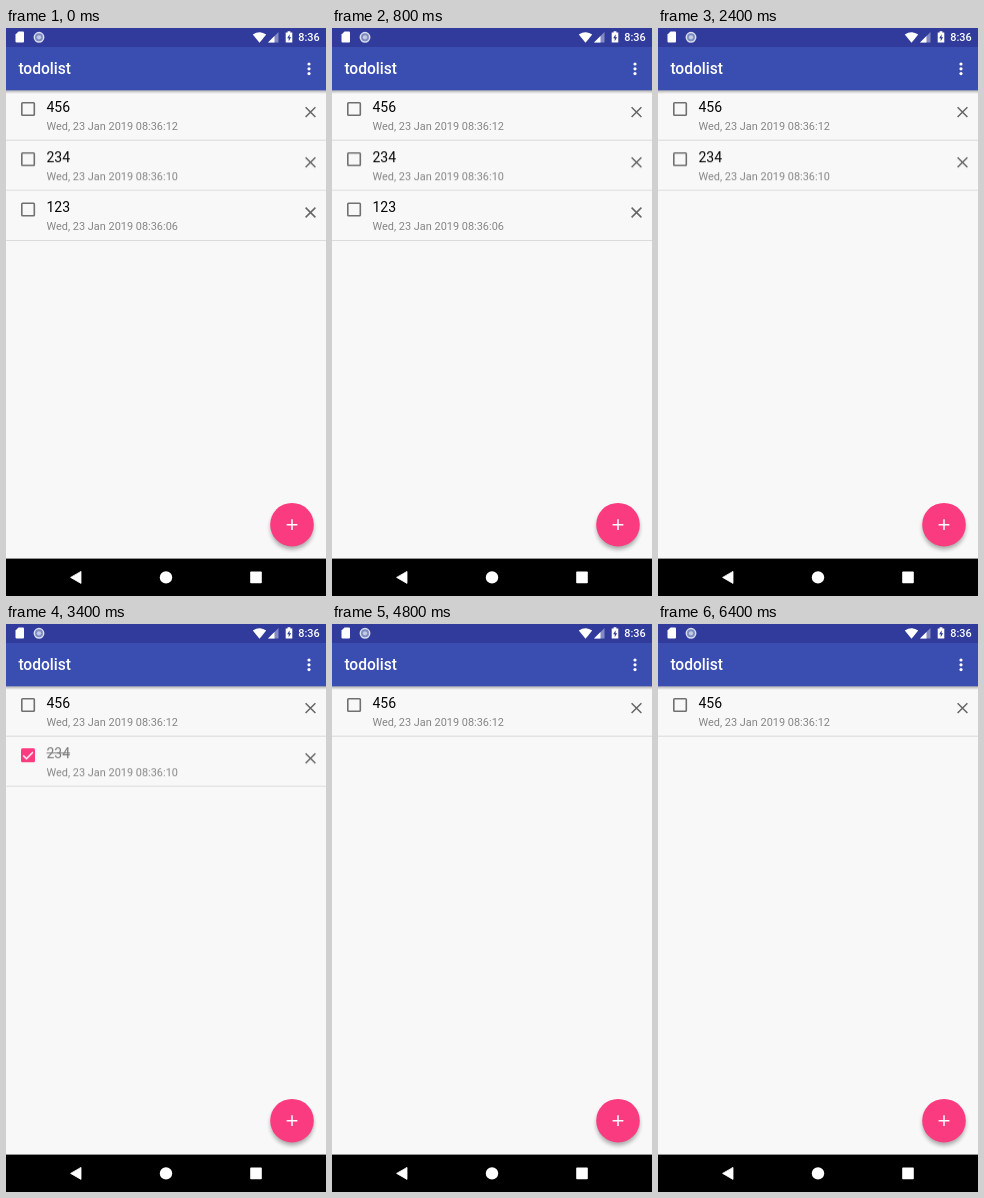
Write an HTML page that moves like this. It is 320 by 568 pixels and loops after 8800 ms.

```html
<!DOCTYPE html>
<html lang="en">
<head>
<meta charset="utf-8">
<title>todolist</title>
<style>
  html, body { margin: 0; width: 100%; height: 100%; overflow: hidden; background: #f8f8f8; }
  svg { display: block; width: 100vw; height: 100vh; font-family: Roboto, sans-serif; }
  .title { font-size: 15.57px; font-weight: 500; fill: #fff; }
  .clock { font-size: 10.9px; font-weight: 500; fill: #fff; }
  .name { font-size: 14px; fill: #050505; }
  .date { font-size: 10.93px; fill: #858585; }
  .done .name { fill: #7a7a7a; }

  /* hard cuts: delete at 2400, tick at 3400, delete at 4800 */
  .last, .open, .done, .second { animation: 8800ms step-end infinite; }
  .last { animation-name: drop-last; }
  .second { animation-name: drop-second; }
  .open { animation-name: untick; }
  .done { animation-name: tick; }
  @keyframes drop-last { 0% { opacity: 1 } 27.2727%, 100% { opacity: 0 } }
  @keyframes drop-second { 0% { opacity: 1 } 54.5455%, 100% { opacity: 0 } }
  @keyframes untick { 0% { opacity: 1 } 38.6364%, 100% { opacity: 0 } }
  @keyframes tick { 0% { opacity: 0 } 38.6364%, 100% { opacity: 1 } }
</style>
</head>
<body>
<svg viewBox="0 0 320 568" preserveAspectRatio="none">
  <defs>
    <linearGradient id="shade" x2="0" y2="1">
      <stop stop-color="#000" stop-opacity=".3"/>
      <stop offset="1" stop-color="#000" stop-opacity="0"/>
    </linearGradient>
    <filter id="blur" x="-30%" y="-30%" width="160%" height="160%">
      <feGaussianBlur stdDeviation="2.2"/>
    </filter>
    <rect id="box" x="15.8" y="74.8" width="12.5" height="12.5" rx=".8" fill="none" stroke="#707070" stroke-width="1.6"/>
    <g id="rest">
      <path d="M299.6 79.2l9.8 9.8m0-9.8l-9.8 9.8" stroke="#666" stroke-width="1.5"/>
      <path d="M0 112.2h320" stroke="#d8d8d8"/>
    </g>
  </defs>

  <rect width="320" height="568" fill="#f8f8f8"/>

  <g>
    <use href="#box"/><use href="#rest"/>
    <text class="name" x="40.5" y="83.5">456</text>
    <text class="date" x="40.5" y="102">Wed, 23 Jan 2019 08:36:12</text>
  </g>

  <g class="second" transform="translate(0 50.2)">
    <use href="#rest"/>
    <text class="date" x="40.5" y="102">Wed, 23 Jan 2019 08:36:10</text>
    <g class="open">
      <use href="#box"/>
      <text class="name" x="40.5" y="83.5">234</text>
    </g>
    <g class="done">
      <rect x="15" y="74" width="14" height="14" rx="1.5" fill="#fb3b7f"/>
      <path d="M17.2 81.2l3.3 3.3 6.4-6.6" fill="none" stroke="#fff" stroke-width="1.5"/>
      <text class="name" x="40.5" y="83.5">234</text>
      <path d="M40.5 78.8h23.6" stroke="#7a7a7a"/>
    </g>
  </g>

  <g class="last" transform="translate(0 100.4)">
    <use href="#box"/><use href="#rest"/>
    <text class="name" x="40.5" y="83.5">123</text>
    <text class="date" x="40.5" y="102">Wed, 23 Jan 2019 08:36:06</text>
  </g>

  <!-- app bar -->
  <rect y="62" width="320" height="4" fill="url(#shade)"/>
  <rect y="19" width="320" height="43.3" fill="#3a4db0"/>
  <rect width="320" height="19" fill="#303b9b"/>
  <text class="title" x="12.4" y="46.2">todolist</text>
  <g fill="#fff">
    <circle cx="303" cy="36" r="1.6"/>
    <circle cx="303" cy="40.8" r="1.6"/>
    <circle cx="303" cy="45.6" r="1.6"/>
  </g>

  <!-- status icons -->
  <g fill="#fff">
    <path d="M12.5 3.5H17q1 0 1 1v9q0 1-1 1h-6.5q-1 0-1-1v-7z"/>
    <path d="M246.8 6.6Q253.5 1.8 260.2 6.6L253.5 14.8z"/>
    <path d="M272.5 4v10.5H262z" opacity=".4"/>
    <path d="M268.5 8v6.5H262z"/>
    <path d="M281.6 3.2h2.8v1.2h1.9v10.1h-6.6V4.4h1.9z"/>
  </g>
  <path d="M283.6 6.2l-2.4 4h1.5v3l2.4-4h-1.5z" fill="#303b9b"/>
  <circle cx="33" cy="9.3" r="4.7" fill="#7d8cc0" stroke="#d8dced" stroke-width="1.5"/>
  <circle cx="33" cy="9.3" r="2.1" fill="#c3cbe2"/>
  <text class="clock" x="292.2" y="13.2">8:36</text>

  <!-- add button -->
  <circle cx="286" cy="500" r="21.5" opacity=".32" filter="url(#blur)"/>
  <circle cx="286" cy="496.7" r="21.8" fill="#fb3b7f"/>
  <path d="M280.6 496.7h10.8m-5.4-5.4v10.8" stroke="#fff" stroke-width="1.5"/>

  <!-- navigation bar -->
  <rect y="530.6" width="320" height="37.4"/>
  <g fill="#fff">
    <path d="M64.6 549.4L75 543.4v12z" stroke="#fff" stroke-width=".8" stroke-linejoin="round"/>
    <circle cx="160" cy="549.4" r="6.2"/>
    <rect x="244.2" y="543.6" width="11.6" height="11.6" rx=".8"/>
  </g>
</svg>
</body>
</html>
```
